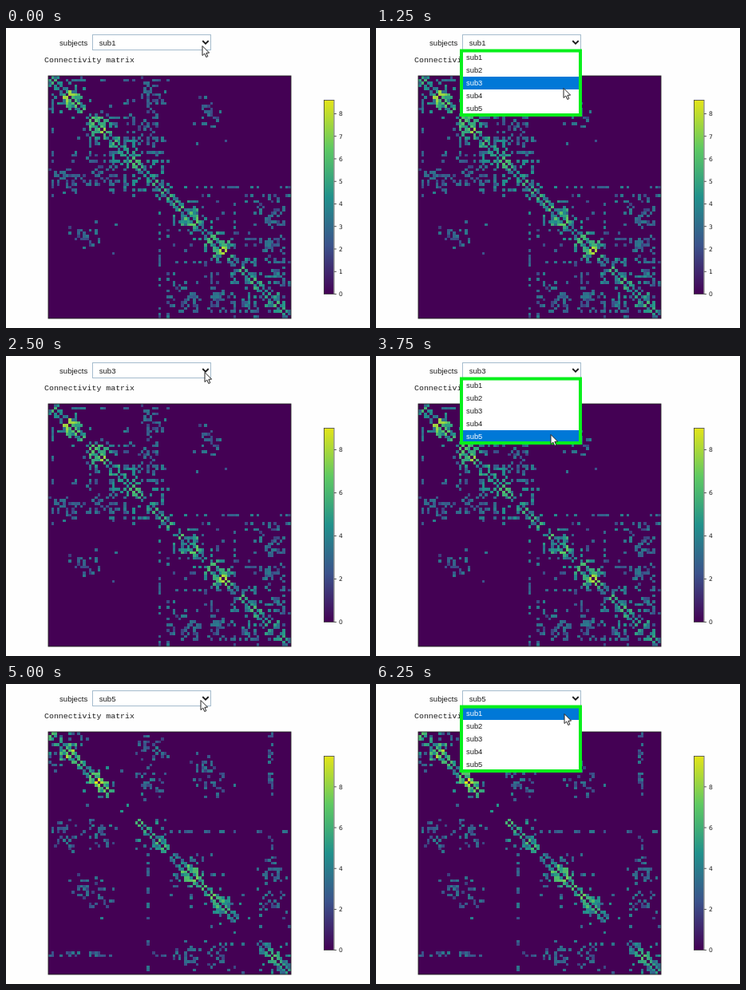
These frames come from a looping animation (456 by 376 pixels, 7.5 s). An HTML page with a canvas:

```html
<!DOCTYPE html>
<html lang="en">
<head>
<meta charset="utf-8">
<title>Connectivity matrix</title>
<style>
  html, body { margin: 0; width: 100%; height: 100%; overflow: hidden; background: #fefefe; }
  canvas { display: block; }
</style>
</head>
<body>
<canvas id="stage" width="456" height="376"></canvas>
<script>
const ctx = document.getElementById('stage').getContext('2d');
const STEP = 1250;
const HALF = 42, N = 2 * HALF;
const LEFT = 53, TOP = 60, SIZE = 304;
const SANS = '"Liberation Sans", Arial, sans-serif';
const MONO = '"Liberation Mono", monospace';
const TICK = '"DejaVu Sans", sans-serif';
const INK = '#1c1c1c';

const VIRIDIS = ['#440154', '#3b528b', '#21918c', '#5ec962', '#e4e419']
  .map(h => [1, 3, 5].map(k => parseInt(h.slice(k, k + 2), 16)));

// Both hemispheres share one layout: front, middle and deep modules.
// reach: how far links extend; bridges: nodes wired to the other side.
const DENSE = { seed: 5, density: .55, reach: 45, bridges: [38, 41], crossing: .2, quiet: 0 };
const SUBJECTS = {
  sub1: { ...DENSE, keep: .98, max: 8.6, tick: 1 },
  sub3: { ...DENSE, keep: .86, max: 9, tick: 2 },
  sub5: { seed: 12, density: .42, reach: 11, bridges: [34, 76, 77], crossing: .5, quiet: 3,
    keep: .96, max: 9.5, tick: 2 }
};
const NAMES = ['sub1', 'sub2', 'sub3', 'sub4', 'sub5'];

// open: highlighted menu row, or -1 when the menu is closed
const SCENES = [
  { subject: 'sub1', open: -1, cursor: [246, 22.5] },
  { subject: 'sub1', open: 2, cursor: [235, 75.5] },
  { subject: 'sub3', open: -1, cursor: [249, 20.5] },
  { subject: 'sub3', open: 4, cursor: [219, 98.5] },
  { subject: 'sub5', open: -1, cursor: [244, 20.5] },
  { subject: 'sub5', open: 0, cursor: [236, 37.5] }
];

function randomFrom(seed) {
  let a = seed * 7919;
  return () => {
    a = (a + 0x6D2B79F5) | 0;
    let t = Math.imul(a ^ (a >>> 15), 1 | a);
    t = (t + Math.imul(t ^ (t >>> 7), 61 | t)) ^ t;
    return ((t ^ (t >>> 14)) >>> 0) / 4294967296;
  };
}

function viridis(v) {
  const x = Math.max(0, Math.min(1, v)) * (VIRIDIS.length - 1);
  const k = Math.min(VIRIDIS.length - 2, Math.floor(x));
  const mix = VIRIDIS[k].map((c, n) => Math.round(c + (VIRIDIS[k + 1][n] - c) * (x - k)));
  return `rgb(${mix})`;
}

const bump = (a, b, ca, cb, r) => Math.exp(-((a - ca) ** 2 + (b - cb) ** 2) / (r * r));
const moduleOf = a => a < 12 ? 0 : a < 33 ? 1 : 2;

function buildMatrix({ seed, density, reach, bridges, crossing, quiet, keep }) {
  const rnd = randomFrom(seed), drop = randomFrom(seed + keep);
  const hub = Array.from({ length: HALF }, () => rnd() < .45 ? .35 : 1.35);
  const muted = a => Math.abs(a - 26) <= quiet && quiet > 0;

  function within(a, b) {
    const core = bump(a, b, 7, 7, 3) + bump(a, b, 17, 17, 3);
    const deep = bump(a, b, 5, 35, 4) + bump(a, b, 17, 34, 3);
    const separate = moduleOf(a) === 0 && moduleOf(b) === 1;
    const spread = density * Math.exp((a - b) / reach) * (separate ? .3 : 1);
    return { p: .8 * core + .5 * deep + spread * hub[a] * hub[b], core };
  }

  function across(i, a, j, b) {
    const bridge = bridges.includes(i) || bridges.includes(j);
    const paired = bump(a, b, 12, 12, 3) + crossing * bump(a, b, 17, 14, 5);
    return .5 * paired + (bridge ? .36 : 0);
  }

  const m = Array.from({ length: N }, () => new Float32Array(N));
  for (let i = 0; i < N; i++) {
    for (let j = i + 1; j < N; j++) {
      const a = i % HALF, b = j % HALF, gap = j - i;
      const near = Math.exp(-gap / 5);
      const { p, core } = i < HALF && j >= HALF
        ? { p: across(i, a, j, b), core: 0 } : within(a, b);
      const chance = (muted(a) || muted(b) ? .12 * p : p) + (gap < 3 && !muted(a) ? .75 / gap : 0);
      const hit = rnd() < chance;
      const v = (.32 + .25 * near + .25 * core) * (.6 + .75 * rnd());
      if (hit && drop() < keep) m[i][j] = m[j][i] = v;
    }
  }
  return m;
}

for (const s of Object.values(SUBJECTS)) s.matrix = buildMatrix(s);

function box(x, y, w, h, color) {
  ctx.fillStyle = color;
  ctx.fillRect(x, y, w, h);
}

function frame(x, y, w, h, color, width = 1) {
  ctx.strokeStyle = color;
  ctx.lineWidth = width;
  ctx.strokeRect(x, y, w, h);
}

function label(text, x, y, size, family, color = INK) {
  ctx.font = `${size}px ${family}`;
  ctx.fillStyle = color;
  ctx.fillText(text, x, y);
}

function drawMatrix(m) {
  const edge = k => Math.round(k * SIZE / N);
  box(LEFT, TOP, SIZE, SIZE, viridis(0));
  m.forEach((row, i) => row.forEach((v, j) => {
    if (!v) return;
    box(LEFT + edge(j), TOP + edge(i), edge(j + 1) - edge(j), edge(i + 1) - edge(i), viridis(v));
  }));
  frame(LEFT, TOP, SIZE, SIZE, '#222', .9);
}

function drawScale({ max, tick }) {
  const x = 398, y = 90.5, w = 12.5, h = 243;
  const g = ctx.createLinearGradient(0, y + h, 0, y);
  VIRIDIS.forEach((c, k) => g.addColorStop(k / (VIRIDIS.length - 1), `rgb(${c})`));
  box(x, y, w, h, g);
  frame(x + .5, y, w, h, '#444', .8);
  for (let v = 0; v < max; v += tick) {
    const ty = y + h - v / max * h;
    box(411, ty - .4, 3, .8, '#333');
    label(v, 417, ty + 2.8, 7.6, TICK);
  }
}

function drawSelect(name) {
  label('subjects', 67, 22, 9.6, SANS);
  box(108, 8, 149, 20, '#fff');
  frame(108.5, 8.5, 148, 19, '#a5bccd');
  label(name, 116.7, 22, 9.6, SANS);
  ctx.strokeStyle = INK;
  ctx.lineWidth = 1.8;
  ctx.beginPath();
  ctx.moveTo(246.3, 16);
  ctx.lineTo(250, 19.7);
  ctx.lineTo(253.7, 16);
  ctx.stroke();
}

function drawMenu(active) {
  box(107, 28, 149, 81, '#fff');
  NAMES.forEach((name, k) => {
    const y = 29 + 16 * k;
    if (k === active) box(108, y, 147, 16, '#0078d7');
    label(name, 113, y + 11, 9.4, SANS, k === active ? '#fff' : INK);
  });
  frame(107, 28.5, 149, 80.5, '#08f01c', 4);
}

function drawCursor([x, y]) {
  const shape = [[0, 0], [0, 12], [2.8, 9.5], [4.8, 14], [6.8, 13.1], [4.9, 8.8], [8.6, 8.6]];
  ctx.beginPath();
  shape.forEach(([dx, dy]) => ctx.lineTo(x + dx, y + dy));
  ctx.closePath();
  ctx.fillStyle = '#fff';
  ctx.fill();
  ctx.strokeStyle = '#222';
  ctx.lineWidth = 1;
  ctx.stroke();
}

function draw({ subject, open, cursor }) {
  const data = SUBJECTS[subject];
  box(0, 0, 456, 376, '#fefefe');
  label('Connectivity matrix', 48, 43, 9.92, MONO);
  drawMatrix(data.matrix);
  drawScale(data);
  drawSelect(subject);
  if (open >= 0) drawMenu(open);
  drawCursor(cursor);
}

let shown = -1;
function tick() {
  const k = Math.floor(performance.now() / STEP) % SCENES.length;
  if (k !== shown) draw(SCENES[shown = k]);
  requestAnimationFrame(tick);
}
tick();
</script>
</body>
</html>
```
